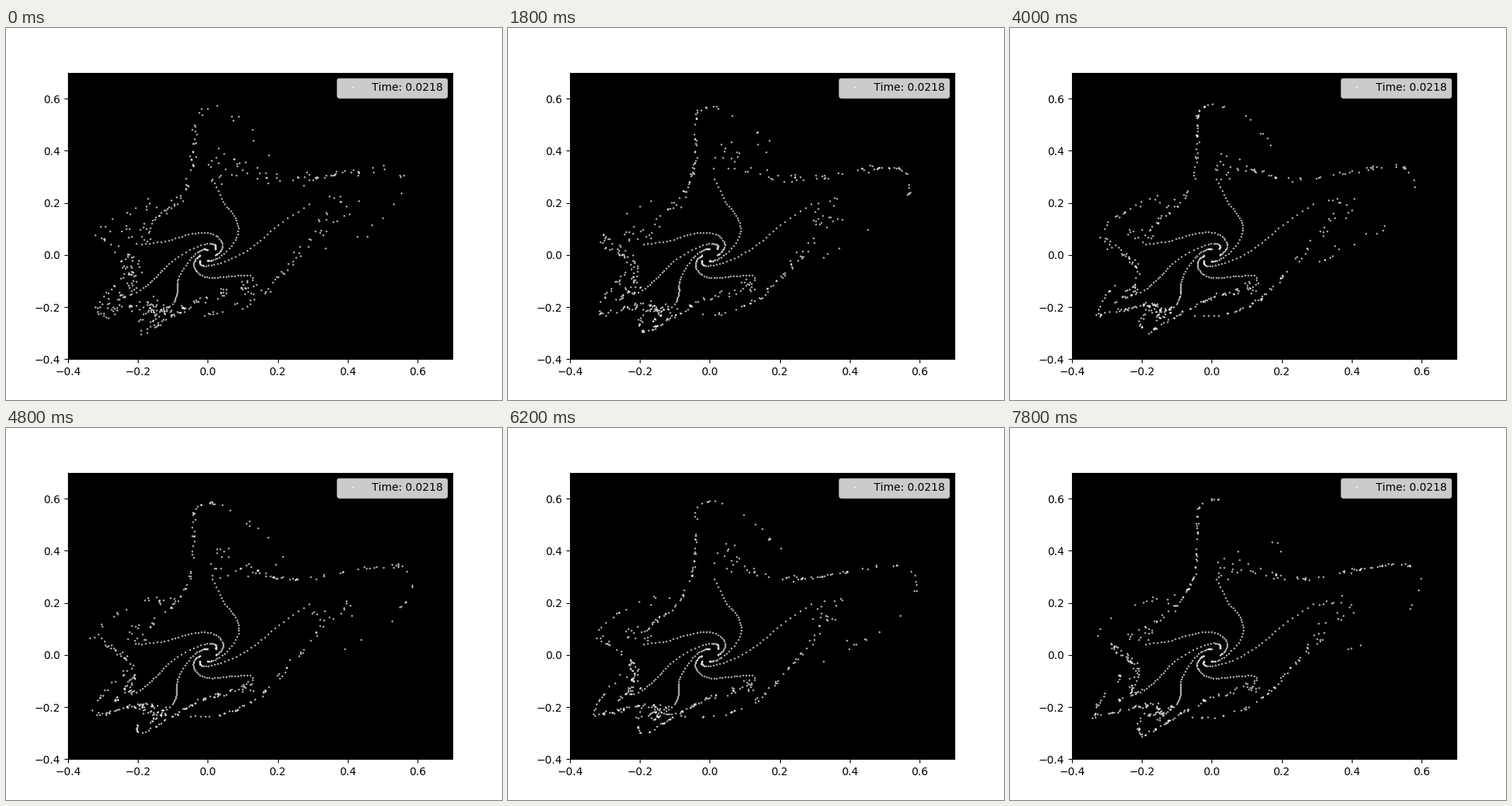
Animation, 640 px wide and 480 px high, one loop 8000 ms. Source, as a matplotlib script:

```python
import numpy as np
import matplotlib.pyplot as plt
from matplotlib.animation import FuncAnimation

FRAMES = 40
STEP_MS = 200
ARM_DOTS, RIM_DOTS, SWIRL_DOTS = 38, 60, 14
TIP = .87  # share of the rim dots that lie before the lobe's tip


def turn(p):
    """One step of a quadratic map that carries each lobe to the next one."""
    x, y = p.T
    return np.column_stack([
        y - .05 * x - 1.05 * x * x,
        1.03 * y - 1.05 * x + 1.1 * x * x - 1.2 * x * y - y * y])


def smooth(pts, n=24):
    """Catmull-Rom curve through pts and its running length."""
    p = np.array(pts, float)
    p = np.vstack([2 * p[0] - p[1], p, 2 * p[-1] - p[-2]])
    t = np.linspace(0, 1, n, endpoint=False)[:, None]
    parts = []
    for a, b, c, d in zip(p, p[1:], p[2:], p[3:]):
        parts.append(b + .5 * t * (c - a + t * (2 * a - 5 * b + 4 * c - d
                                                + t * (3 * (b - c) + d - a))))
    curve = np.vstack(parts + [p[-2:-1]])
    gaps = np.hypot(*np.diff(curve, axis=0).T)
    return curve, np.concatenate([[0], np.cumsum(gaps)])


def along(path, s):
    curve, length = path
    return np.column_stack([np.interp(s, length, curve[:, k]) for k in (0, 1)])


class Lobe:
    """A spiral arm, the rim it feeds and the loose swirl between them."""

    def __init__(self, arm, edge, arc, swirl, turns, rng):
        self.turns = turns
        self.u = np.linspace(0, 1, ARM_DOTS)
        path = smooth(arm)
        self.arm = along(path, path[1][-1] * self.u ** 1.4)

        self.path = smooth(edge + arc)
        self.full = self.path[1][-1]
        self.tip = smooth(edge)[1][-1]
        self.phase = rng.random(RIM_DOTS)
        self.noise = rng.normal(size=(RIM_DOTS, 2))
        self.pull = rng.random(RIM_DOTS) ** 2

        self.swirl = swirl
        self.angle = rng.uniform(0, 2 * np.pi, SWIRL_DOTS)
        self.radius = np.sqrt(rng.uniform(.05, 1.2, SWIRL_DOTS))

    def place(self, p, grow=0):
        for _ in range(self.turns):
            p = turn(p)
        return p * (1 + np.reshape(grow, (-1, 1)))

    def points(self, t):
        grow = .07 * t / 8
        loose = max(0, 1 - t / 2.8)

        v = (self.phase + .15 * t) % 1
        s = np.interp(v, [0, TIP, 1], [0, self.tip, self.full])
        w = np.clip(s / self.tip, 0, 1)
        past = np.clip((v - TIP) / (1 - TIP), 0, 1)
        width = .002 + .004 * loose + .004 * past + .005 * (1 - w) ** 4
        rim = along(self.path, s) + self.noise * width[:, None]
        rim *= (1 - self.pull * past * (.1 + .15 * loose))[:, None]

        cx, cy, size = self.swirl
        a = self.angle - 1.5 * t
        r = self.radius * size * (1 + .2 * loose)
        cloud = np.column_stack([cx + r * np.cos(a), cy + r * np.sin(a)])

        return np.vstack([self.place(self.arm, grow * (1 - self.u)),
                          self.place(rim, grow * w ** 2),
                          self.place(cloud)])


# Two lobes are drawn by hand; the map gives the two that follow each of them.
LEFT = dict(
    arm=[(.022, 0), (.036, .016), (.042, .042), (.026, .072), (-.005, .086),
         (-.045, .082), (-.085, .068), (-.123, .053), (-.19, .042)],
    edge=[(-.18, .09), (-.15, .135), (-.1, .19), (-.07, .245), (-.05, .31),
          (-.042, .4), (-.04, .5), (-.035, .54), (-.01, .56), (.02, .558)],
    arc=[(.08, .525), (.14, .465), (.21, .36)],
    swirl=(-.205, .08, .034))
BOTTOM = dict(
    arm=[(-.022, -.002), (-.036, -.018), (-.04, -.045), (-.022, -.075),
         (.01, -.087), (.066, -.081), (.121, -.079), (.128, -.095)],
    edge=[(.08, -.135), (0, -.163), (-.05, -.193), (-.1, -.23),
          (-.175, -.288), (-.193, -.284), (-.197, -.26)],
    arc=[(-.195, -.23), (-.18, -.2)],
    swirl=(.11, -.12, .024))

rng = np.random.default_rng(11)
lobes = [Lobe(**seed, turns=k, rng=rng)
         for seed in (LEFT, BOTTOM) for k in range(3)]

plt.rcParams["text.kerning_factor"] = 6
fig, ax = plt.subplots(figsize=(6.4, 4.8), dpi=100)
ax.set_facecolor("black")
ax.set_xlim(-.4, .7)
ax.set_ylim(-.4, .7)
dots, = ax.plot([], [], "w.", markersize=1, label="Time: 0.0218")
ax.legend(loc="upper right")


def draw(i):
    t = i * STEP_MS / 1000
    xy = np.vstack([lobe.points(t) for lobe in lobes])
    dots.set_data(xy[:, 0], xy[:, 1])
    return dots,


anim = FuncAnimation(fig, draw, frames=FRAMES, interval=STEP_MS,
                     repeat=True, repeat_delay=0)
plt.show()
```
